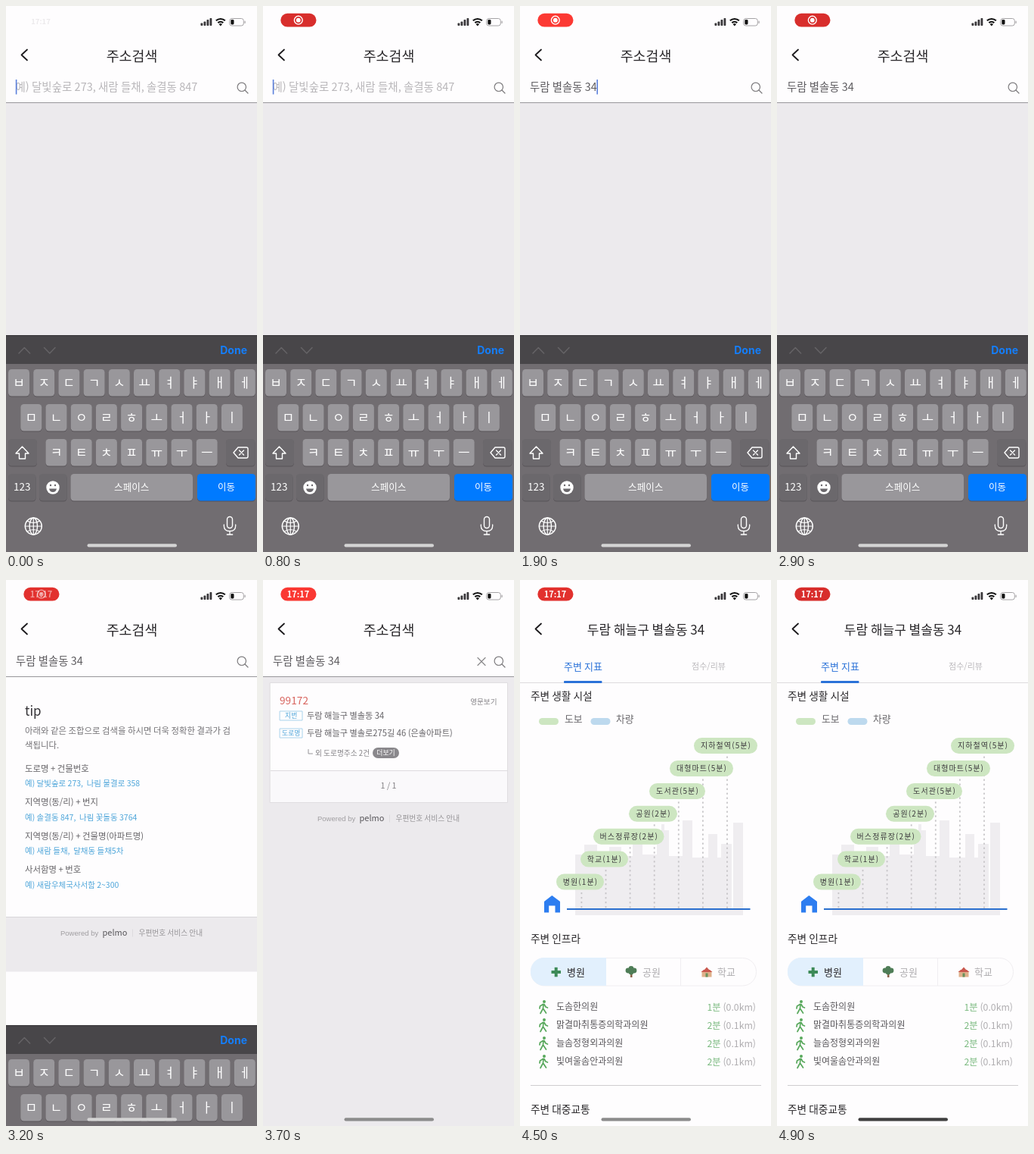
An HTML page with a canvas that plays this animation: 332 px wide and 720 px high, repeating every 5000 ms.

```html
<!DOCTYPE html>
<html lang="ko">
<head>
<meta charset="utf-8">
<title>주소검색</title>
<style>
html, body { margin: 0; width: 100%; height: 100%; overflow: hidden; background: #fefdfe; }
canvas { display: block; width: 332px; height: 720px; }
</style>
</head>
<body>
<canvas id="stage"></canvas>
<script>
const W = 332, H = 720, LOOP = 5000;
const canvas = document.getElementById('stage');
const c = canvas.getContext('2d');
const ratio = window.devicePixelRatio || 1;
canvas.width = W * ratio;
canvas.height = H * ratio;

const SANS = '"Noto Sans CJK KR", "Noto Sans CJK", "Noto Sans", sans-serif';
const PAPER = '#fefdfe', GREY = '#eceaed', BLUE = '#2b72d8', SKY = '#4fa6da';
const QUERY = '두람 별솔동 34';
const ADDRESS = '두람 해늘구 별솔동 34';
const TYPED = ('ㄷ|두|둘|두라|두람|두람 |두람 ㅂ|두람 벼|두람 별|두람 볈|두람 별소|두람 별솔|' +
  '두람 별솔ㄷ|두람 별솔도|두람 별솔동|두람 별솔동 |두람 별솔동 3|' + QUERY).split('|');

const clamp = v => Math.max(0, Math.min(1, v));

function text(s, x, y, size, color, { align = 'left', weight = 400, family = SANS, spacing = 0 } = {}) {
  c.font = `${weight} ${size}px ${family}`;
  c.letterSpacing = spacing + 'px';
  c.textAlign = align;
  c.fillStyle = color;
  c.fillText(s, x, y + size * 0.37);
  return c.measureText(s).width;
}
const centered = (s, x, y, size, color, weight, spacing) =>
  text(s, x, y, size, color, { align: 'center', weight, spacing });

function rect(x, y, w, h, color) {
  c.fillStyle = color;
  c.fillRect(x, y, w, h);
}

function box(x, y, w, h, r, fill, stroke) {
  c.beginPath();
  c.roundRect(x, y, w, h, r);
  if (fill) { c.fillStyle = fill; c.fill(); }
  if (stroke) { c.strokeStyle = stroke; c.lineWidth = 1; c.stroke(); }
}

function path(d, color, width) {
  const p = new Path2D(d);
  if (width) {
    c.strokeStyle = color;
    c.lineWidth = width;
    c.stroke(p);
  } else {
    c.fillStyle = color;
    c.fill(p);
  }
}

function disc(x, y, r, color, width) {
  c.beginPath();
  c.arc(x, y, r, 0, 7);
  if (width) { c.strokeStyle = color; c.lineWidth = width; c.stroke(); }
  else { c.fillStyle = color; c.fill(); }
}

function at(x, y, draw) {
  c.save();
  c.translate(x, y);
  draw();
  c.restore();
}

function recordPill(t) {
  if (t < 100) {
    centered('17:17', 46, 20, 9.5, '#eceaec', 700);
    return;
  }
  const dark = (1 + Math.cos((t - 850) / 2000 * Math.PI * 2)) / 2;
  const mix = (a, b) => Math.round(a + (b - a) * dark);
  box(23.3, 9.8, 47.2, 17.8, 8.9, `rgb(${mix(252, 216)},${mix(57, 46)},${mix(51, 44)})`);
  const clock = clamp((t - 3050) / 300);
  c.globalAlpha = 1 - clock;
  disc(46.8, 18.7, 5.4, '#fff', 1.4);
  disc(46.8, 18.7, 2.9, '#fff');
  c.globalAlpha = clock;
  centered('17:17', 46.5, 19, 11, '#fff', 700);
  c.globalAlpha = 1;
}

function statusBar(t) {
  recordPill(t);
  [3.5, 5.5, 8, 10].forEach((h, i) => box(257.5 + i * 4, 26 - h, 2.8, h, 0.8, '#3a383b'));
  c.lineCap = 'butt';
  for (const r of [5.2, 9]) {
    c.beginPath();
    c.arc(283.8, 26, r, -2.3, -0.84);
    c.strokeStyle = '#111';
    c.lineWidth = 2.2;
    c.stroke();
  }
  path('M283.8 26.5L281.6 24Q283.8 22.2 286 24Z', '#111');
  c.lineCap = 'round';
  box(295.7, 16.5, 18.6, 9.5, 3, null, '#a5a3a6');
  box(297.3, 18, 4.2, 6.5, 1.4, '#111');
  rect(315.5, 19.7, 1.2, 3.2, '#a5a3a6');
}

function header(title, size, weight) {
  path('M28 57.5L20.5 64.5L28 71.5', '#1c1a1d', 1.8);
  centered(title, 166.5, 66, size, '#2a282b', weight);
}

function searchField(t) {
  const step = Math.min(TYPED.length - 1, Math.floor((t - 850) / 56));
  let end = 13;
  if (step < 0) text('예) 달빛숲로 273, 새람 들채, 솔결동 847', 12.5, 106.5, 14.5, '#b9b7ba');
  else end += text(TYPED[step], 13, 106.5, 14.4, '#5f5d61');
  if (t < 2500) rect(end - 0.2, 97, 1.6, 19.5, '#5a7fdc');
  disc(311.8, 106.8, 5.7, '#7c7a7d', 1.2);
  path('M316 111L320 115', '#7c7a7d', 1.2);
  if (t >= 3500) path('M284 102.5L294 112.5M294 102.5L284 112.5', '#8a888b', 1.2);
  rect(0, 127, W, 1, '#98969a');
}

function key(label, x, y, w, fill, size = 17) {
  box(x, y + 1, w, 35.5, 4.5, 'rgba(50,46,50,.4)');
  box(x, y, w, 35.5, 4.5, fill);
  centered(label, x + w / 2, y + 17.5, size, '#fff');
}

function shiftIcon() {
  path('M21.5 581L30 590H25.5V597H17.5V590H13Z', '#fff', 1.4);
}

function eraseIcon() {
  path('M307 582H318Q320 582 320 584V594Q320 596 318 596H307L301 589Z', '#fff', 1.4);
  path('M308.5 586L314.5 592M314.5 586L308.5 592', '#fff', 1.3);
}

function smileIcon(shade) {
  disc(62, 635, 8.7, '#fff');
  path('M57 636.5H67Q66 641 62 641T57 636.5Z', shade);
  disc(59, 632, 1.2, shade);
  disc(65, 632, 1.2, shade);
}

function globeIcon() {
  disc(36.3, 686, 11, '#fff', 1.4);
  c.beginPath();
  c.ellipse(36.3, 686, 5.2, 11, 0, 0, 7);
  c.stroke();
  path('M36.3 675V697M25.3 686H47.3M28 679Q36.3 684 44.6 679M28 693Q36.3 688 44.6 693', '#fff', 1.2);
}

function micIcon() {
  c.strokeStyle = '#fff';
  c.lineWidth = 1.4;
  c.beginPath();
  c.roundRect(292.5, 673.5, 7, 15, 3.5);
  c.stroke();
  path('M288.3 684V685.5Q288.3 692.5 296 692.5T303.7 685.5V684M296 692.5V697M292.3 697H299.7', '#fff', 1.3);
}

function keyboard(drop, goPressed) {
  const plain = '#99979b', special = '#6b686c';
  at(0, drop, () => {
    rect(0, 434, W, 286, '#716d71');
    rect(0, 434, W, 38, '#484649');
    rect(0, 434, W, 1, '#343235');
    path('M17 458L24.3 450.5L31.6 458M50.5 450.5L57.8 458L65 450.5', '#656366', 1.5);
    text('Done', 319, 453.5, 14, '#147efb', { align: 'right', weight: 700, family: 'Inter, sans-serif' });
    [['ㅂㅈㄷㄱㅅㅛㅕㅑㅐㅔ', 3, 479], ['ㅁㄴㅇㄹㅎㅗㅓㅏㅣ', 19.3, 525], ['ㅋㅌㅊㅍㅠㅜㅡ', 52.5, 571]]
      .forEach(([letters, x, y]) => [...letters].forEach((l, i) => key(l, x + i * 33.2, y, 28, plain)));
    key('', 3, 571, 38, special);
    key('', 291, 571, 38.5, special);
    key('123', 3, 617, 36.5, special, 13.5);
    key('', 44, 617, 36.5, special);
    key('스페이스', 85.5, 617, 161.5, plain, 12.6);
    key('이동', 253, 617, 77, goPressed ? plain : '#007aff', 12.4);
    shiftIcon();
    eraseIcon();
    smileIcon(special);
    globeIcon();
    micIcon();
  });
}

function poweredBy(y) {
  text('Powered by', 72, y, 9.5, '#a09ea1', { family: '"Liberation Sans", sans-serif' });
  text('pelmo', 127.5, y - 0.5, 11, '#5a585c', { weight: 500 });
  rect(167, y - 5, 1, 10, '#dddbde');
  text('우편번호 서비스 안내', 175.5, y, 9.7, '#969497');
}

function tipPage() {
  text('tip', 25, 173, 17, '#333135');
  text('아래와 같은 조합으로 검색을 하시면 더욱 정확한 결과가 검', 25, 199, 11.4, '#757377');
  text('색됩니다.', 25, 218, 11.4, '#757377');
  [
    ['도로명 + 건물번호', '예) 달빛숲로 273,  나림 물결로 358'],
    ['지역명(동/리) + 번지', '예) 솔결동 847,  나림 꽃돌동 3764'],
    ['지역명(동/리) + 건물명(아파트명)', '예) 새람 들채,  달채동 들채5차'],
    ['사서함명 + 번호', '예) 새람우체국사서함 2~300']
  ].forEach(([kind, example], i) => {
    text(kind, 25, 248.5 + i * 44.4, 11.4, '#666468');
    text(example, 25, 268.5 + i * 44.4, 10.5, SKY);
  });
  rect(0, 444, W, 72.5, GREY);
  rect(0, 444, W, 1, '#d8d6d9');
  poweredBy(465.5);
}

function resultPage() {
  rect(0, 128, W, H, GREY);
  box(9.5, 135.5, 314, 158, 0, PAPER, '#dfdde0');
  rect(10, 251, 313, 42, '#faf9fb');
  rect(10, 251, 313, 1, '#dddbde');
  text('99172', 22, 158.5, 13.7, '#d8655f');
  text('영문보기', 309.5, 160.5, 9.6, '#858387', { align: 'right' });
  [['지번', ADDRESS], ['도로명', '두람 해늘구 별솔로275길 46 (은솔아파트)']].forEach(([tag, line], i) => {
    const y = 179 + i * 23;
    box(22.5, y - 6, 29.5, 12, 0, null, '#a9d3ec');
    centered(tag, 37.2, y, 8.8, SKY);
    text(line, 58, y - 0.5, 11.2, '#656367');
  });
  path('M60 223.5V229H65.5', '#979599', 1);
  text('외 도로명주소 2건', 69, 228, 9.7, '#858387');
  box(145, 221, 35, 14, 7, '#8a888c');
  centered('더보기', 162.5, 228, 8.9, '#fff');
  centered('1 / 1', 166, 271, 10.8, '#858387');
  poweredBy(314.5);
}

function skyline() {
  // Each building: left edge, width, top.
  [[73, 12, 362], [85, 17, 349], [102, 16, 358], [118, 16, 352], [134, 15, 364], [149, 13, 345],
    [162, 19, 362], [181, 16, 330], [187, 4, 322], [197, 18, 364], [215, 13, 317], [228, 21, 366],
    [249, 12, 335], [261, 5, 366], [266, 14, 348], [282, 13, 320]]
    .forEach(([x, w, top]) => rect(x, top, w, 434 - top, '#efedf0'));
  rect(73, 433, 222, 9, '#efedf0');
}

function chart() {
  skyline();
  const stops = [
    ['병원(1분)', 48, 63], ['학교(1분)', 80, 63], ['버스정류장(2분)', 97, 93.5], ['공원(2분)', 144, 64],
    ['도서관(5분)', 171, 74], ['대형마트(5분)', 198, 84], ['지하철역(5분)', 230, 84]
  ];
  stops.forEach((s, i) => {
    for (let y = 412 - i * 29.9; y < 432; y += 6) rect(80.5 + i * 32.1, y, 1.8, 2.2, '#c6c4c7');
  });
  stops.forEach(([label, x, w], i) => {
    const y = 387.5 - i * 29.9;
    box(x, y, w, 21, 10.5, '#cde6c1');
    centered(label, x + w / 2 + 0.5, y + 10.5, 10, '#3d3b3e', 500, 1.1);
  });
  rect(62, 433, 242.5, 2, '#2a6fce');
  path('M42.3 416L53 424V438.5H46.5V429.5H38.2V438.5H32V424Z', '#2d7df0');
}

function walker(x, y) {
  at(x, y, () => {
    disc(1, -7, 2, '#58a85c');
    path('M0 -3.5L-0.5 2L3.5 8M-0.5 2L-4 8.5M-0.5 -3.5L-4.5 -1L-5 2M1 -3.5L3 0L5.5 1', '#58a85c', 1.7);
  });
}

function categories() {
  box(14.5, 498.5, 298, 36.5, 18, PAPER, '#f0eef1');
  box(14, 498, 100, 37, [18, 0, 0, 18], '#e2f0fd');
  rect(212, 499, 1, 36, '#f0eef1');
  rect(41.5, 515, 12.5, 4, '#3d8a58');
  rect(45.7, 510.8, 4, 12.5, '#3d8a58');
  centered('병원', 74, 517.5, 13, '#2a282b', 500);
  rect(146, 517, 2.5, 7, '#8a6248');
  [[143, 515], [147, 512.5], [151, 515], [147, 517]].forEach(([x, y]) => disc(x, y, 3.4, '#4f7d57'));
  centered('공원', 174, 517.5, 13, '#aeacaf');
  rect(240.5, 516, 13, 7.5, '#dfb08a');
  path('M239.5 517L243 514H251L254.5 517ZM243 515L247 510.5L251 515Z', '#c9584e');
  rect(245.5, 518.5, 3, 5, '#69915b');
  centered('학교', 273, 517.5, 13, '#aeacaf');
}

function clinics() {
  ['도솜한의원', '맑결마취통증의학과의원', '늘솜정형외과의원', '빛여울솜안과의원'].forEach((name, i) => {
    const y = 563 + i * 24;
    walker(31, y);
    text(name, 48, y, 12, '#5a585c');
    const distance = i ? ' (0.1km)' : ' (0.0km)';
    const w = text(distance, 312, y, 12.3, '#aeacaf', { align: 'right' });
    text(i ? '2분' : '1분', 312 - w, y, 12.3, '#7cba80', { align: 'right' });
  });
}

function detailPage() {
  const heading = (s, y) => text(s, 14, y, 13.7, '#2a282b', { weight: 500 });
  centered('주변 지표', 83.5, 114, 13, BLUE, 500);
  centered('점수/리뷰', 249.5, 114, 11, '#bbb9bc', 500);
  rect(0, 135, W, 1, '#dddbde');
  box(58, 133, 50.5, 3, 1, BLUE);
  heading('주변 생활 시설', 153);
  box(25, 182, 26, 9, 4.5, '#cde6c1');
  text('도보', 59, 183.5, 12.8, '#6b696d');
  box(93.5, 182, 26, 9, 4.5, '#bdd9ee');
  text('차량', 127, 183.5, 12.8, '#6b696d');
  chart();
  heading('주변 인프라', 473);
  categories();
  clinics();
  rect(14, 666, 305, 1, '#cfcdd0');
  heading('주변 대중교통', 697.5);
}

function homeBar(t) {
  let shade = t < 3300 ? 212 : 140;
  if (t >= 4500) shade = 140 - 76 * clamp((t - 4500) / 300);
  box(107.5, 709.3, 118.5, 4.2, 2.1, `rgb(${shade},${shade},${shade})`);
}

function draw(t) {
  c.setTransform(ratio, 0, 0, ratio, 0, 0);
  c.lineCap = c.lineJoin = 'round';
  rect(0, 0, W, H, PAPER);
  if (t >= 4500) {
    header(ADDRESS, 17, 500);
    detailPage();
  } else {
    header('주소검색', 18.4, 300);
    if (t < 3100) rect(0, 128, W, H, GREY);
    else if (t < 3500) tipPage();
    else if (t < 4100) resultPage();
    if (t < 4100) searchField(t);
    if (t < 3300) keyboard(t < 3100 ? 0 : t < 3200 ? 35 : 153, t >= 2200 && t < 2400);
  }
  statusBar(t);
  homeBar(t);
}

function tick(now) {
  draw(Math.floor((now % LOOP) / 100) * 100);
  requestAnimationFrame(tick);
}
draw(0);
requestAnimationFrame(tick);
</script>
</body>
</html>
```
